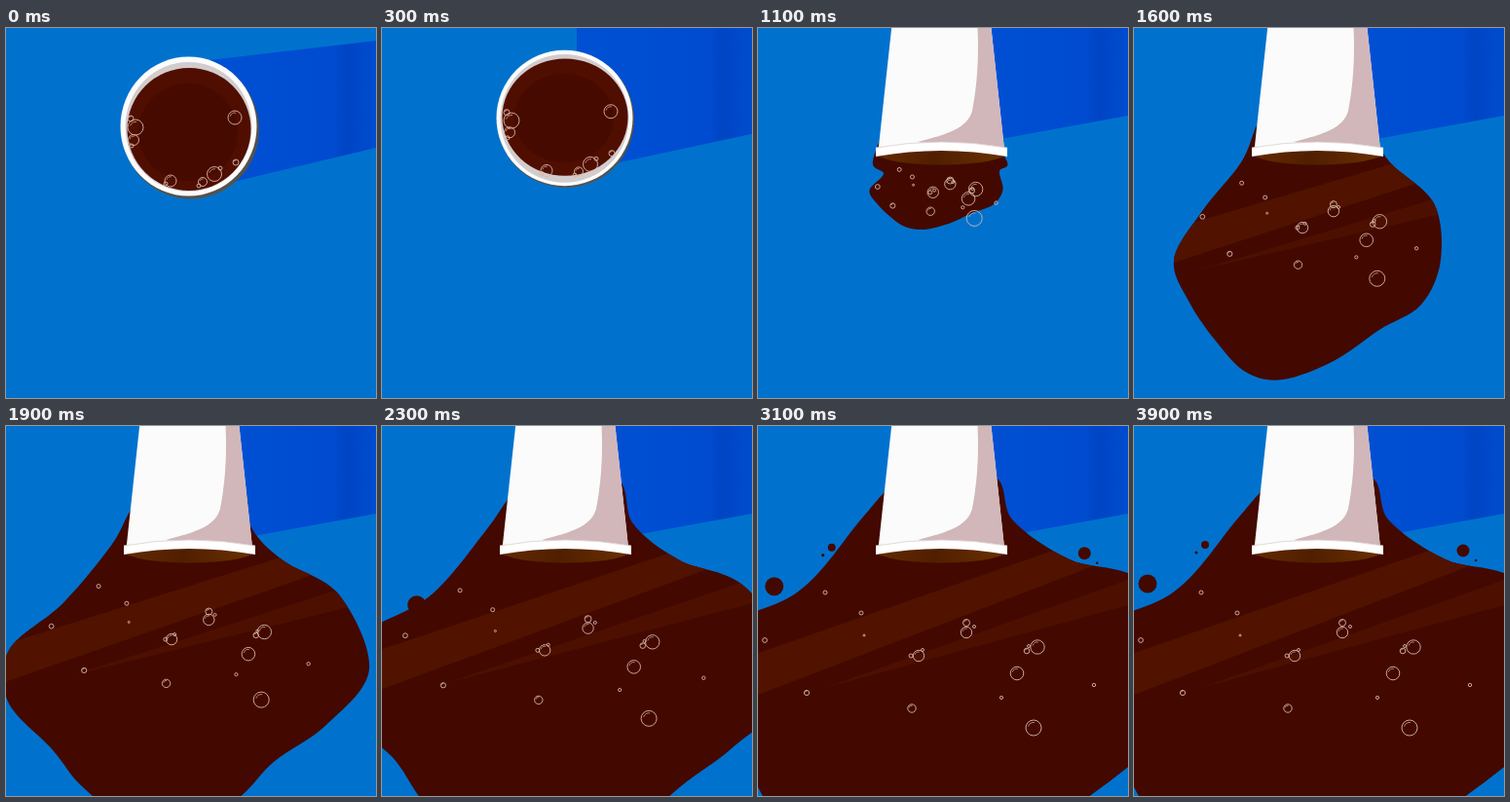
An HTML page with a canvas that plays this animation: 380x380 px, repeating every 4 s.

```html
<!DOCTYPE html>
<html>
<head>
<meta charset="utf-8">
<title>Pouring coffee</title>
<style>
html, body { margin: 0; width: 100%; height: 100%; overflow: hidden; background: #0072ce; }
canvas { display: block; width: 380px; height: 380px; }
</style>
</head>
<body>
<canvas id="stage" width="380" height="380"></canvas>
<script>
const ctx = document.getElementById('stage').getContext('2d');
const LOOP = 4000, STEP = 100, TAU = Math.PI * 2, MAX_TILT = 1.45;
const MOUTH = [188, 131];
const COFFEE = '#430900', STREAK = '#511300', FOAM = '#d9b6a5';

// Key points of the spill: half way, and spread past the stage
const spillMid = [[150,60], [127,98], [110,138], [70,188], [41,238], [57,282], [86,324], [116,354], [153,361],
  [205,342], [252,310], [295,284], [315,238], [308,180], [264,139], [247,110], [235,60]];
const spillEnd = [[150,50], [128,70], [104,98], [40,171], [-60,216], [-90,285], [-17,346], [20,402], [100,480],
  [260,470], [315,402], [385,346], [470,270], [400,163], [320,137], [262,97], [240,50]];

// x, y, radius; cup bubbles as seen from above, the others at rest
const cupBubbles = [[128,93,3], [133,102,8], [131,115,5.5], [129,121,2], [169,157,6], [164,160,2],
  [214,150,7.5], [202,158,4.5], [198,162,2], [220,144,2], [235,92,7], [236,138,3]];
const spillBubbles = [[7,220,2.4], [69,171,2], [106,192,2], [109,215,1], [50,274,2.6], [157,236,2],
  [165,236,5.7], [169,230,1.5], [214,202,3.5], [214,212,5.7], [222,206,1.5], [287,227,7.2], [276,231,2.8],
  [278,226,1.5], [266,254,6.8], [283,310,8], [250,279,1.6], [345,266,1.7], [158,290,4.2]];
const drops = [[14,162,9.5], [73,122,4], [64,130,1.6], [338,128,6.5], [351,138,1.3]];

const mix = (a, b, u) => a + (b - a) * u;
const mixPoints = (a, b, u) => a.map(([x, y], i) => [mix(x, b[i][0], u), mix(y, b[i][1], u)]);
const phase = (t, from, to) => Math.min(1, Math.max(0, (t - from) / (to - from)));
const easeOut = (u, power) => 1 - Math.pow(1 - u, power);
const fromMouth = ([x, y], sx, sy) => [mix(MOUTH[0], x, sx), mix(MOUTH[1], y, sy)];

function fill(color) { ctx.fillStyle = color; ctx.fill(); }

function ellipse(x, y, rx, ry, color) {
  ctx.beginPath();
  ctx.ellipse(x, y, rx, ry, 0, 0, TAU);
  fill(color);
}

function polygon(points, color) {
  ctx.beginPath();
  for (const [x, y] of points) ctx.lineTo(x, y);
  fill(color);
}

// Closed Catmull-Rom curve
function smoothPath(points) {
  const at = i => points[(i + points.length) % points.length];
  ctx.beginPath();
  ctx.moveTo(...points[0]);
  points.forEach((p, i) => {
    const before = at(i - 1), next = at(i + 1), after = at(i + 2);
    ctx.bezierCurveTo(
      p[0] + (next[0] - before[0]) / 6, p[1] + (next[1] - before[1]) / 6,
      next[0] - (after[0] - p[0]) / 6, next[1] - (after[1] - p[1]) / 6, ...next);
  });
}

function bubble(x, y, r) {
  ctx.strokeStyle = FOAM;
  ctx.lineWidth = 0.9;
  ctx.beginPath();
  ctx.arc(x, y, r, 0, TAU);
  ctx.stroke();
  if (r < 2.5) return;
  ctx.lineWidth = 0.7;
  ctx.beginPath();
  ctx.arc(x, y, r * 0.7, 3.4, 4.9);
  ctx.stroke();
}

function drawShadow(t) {
  const u = phase(t, 0, 700);
  const g = ctx.createLinearGradient(225, 0, 380, 0);
  g.addColorStop(0, '#0050d4');
  g.addColorStop(0.72, '#004bcf');
  g.addColorStop(0.8, '#0045c4');
  g.addColorStop(1, '#004ccf');
  polygon([[200, mix(34, -60, u)], [380, mix(13, -80, u)], [380, mix(123, 90, u)], [200, mix(166, 123, u)]], g);
}

function spillShape(t) {
  if (t >= 1600) return mixPoints(spillMid, spillEnd, easeOut(phase(t, 1600, 3100), 2.1));
  // The neck stays at the cup while the rest shrinks into the mouth
  const drip = 0.33 * phase(t, 700, 1100);
  const small = spillMid.map(p => p[1] < 140 ? fromMouth(p, 0.9, 1) : fromMouth(p, 0.5, drip));
  return mixPoints(small, spillMid, easeOut(phase(t, 1100, 1600), 1.5));
}

function drawSpill(t) {
  if (t >= 2200) {
    const left = 26 * (1 - easeOut(phase(t, 2200, 3900), 3));
    for (const [x, y, r] of drops) ellipse(x + (x < MOUTH[0] ? left : -left), y + left, r, r, COFFEE);
  }
  ctx.save();
  smoothPath(spillShape(t));
  fill(COFFEE);
  ctx.clip();
  const shown = phase(t, 1100, 1600);
  const scale = mix(mix(0.4, 0.85, shown), 1, easeOut(phase(t, 1600, 3100), 2.1));
  ctx.globalAlpha = shown;
  ctx.translate(0, MOUTH[1] * (1 - scale));
  ctx.scale(1, scale);
  polygon([[-5, 235], [300, 129], [380, 130], [-5, 278]], STREAK);
  polygon([[68, 269], [380, 158], [380, 184]], '#4d1000');
  ctx.restore();
}

function drawSpillBubbles(t) {
  const u = phase(t, 1100, 3100);
  const sx = mix(0.36, 1, easeOut(u, 2.1)), sy = mix(0.36, 1, easeOut(u, 2.7));
  for (const b of spillBubbles) bubble(...fromMouth(b, sx, sy), b[2]);
}

function drawBody(cy, tilt) {
  const x = 188.3, baseY = cy - 200 * Math.sin(tilt), base = 44 * Math.sqrt(Math.sin(tilt));
  ellipse(x, baseY, base, base * Math.cos(tilt), '#fbfbfb');
  ctx.save();
  polygon([[x - 64.5, cy - 8], [x - base, baseY], [x + base, baseY], [x + 64.5, cy - 8]], '#fbfbfb');
  ctx.clip();
  ctx.translate(0, cy - MOUTH[1]);
  ctx.beginPath();
  ctx.moveTo(222, -90);
  ctx.lineTo(225.5, 0);
  ctx.bezierCurveTo(227, 30, 225, 60, 220, 85);
  ctx.bezierCurveTo(215, 103, 195, 109, 164, 117);
  ctx.lineTo(270, 135);
  ctx.lineTo(270, -90);
  fill('#d1b7b9');
  ctx.restore();
}

function drawOpenCup(t) {
  const tilt = MAX_TILT * Math.pow(t / 1050, 1.5), cos = Math.cos(tilt);
  const turn = phase(t, 0, 700), pour = phase(t, 700, 1000);
  const cy = mix(mix(101, 81, turn), MOUTH[1], pour);
  ellipse(187.5 + 2 * (1 - turn), cy + 3 * (1 - turn), 70.5, 71.5 * cos, '#55524c');
  drawBody(cy, tilt);
  ellipse(187.5, cy, 70, 71.5 * cos, '#fcfcfc');
  ellipse(187.5, cy + 0.5, mix(65, 67.5, turn), mix(66.5, 69, turn) * cos, '#d3cccc');

  // The surface slides over the rim and hangs lower and lower
  const top = cy - mix(60, 66, turn) * cos;
  const bottom = mix(mix(167, 131.5, turn), 187, pour);
  ellipse(188, (top + bottom) / 2, mix(63.5, 66, turn), (bottom - top) / 2, '#4f0e00');
  ellipse(187, mix(107, cy - 19, turn), 51, mix(50, 42, turn) * cos, '#470a00');
  for (const [x, y, r] of cupBubbles) bubble(x, mix(cy, bottom, pour / 2) + mix(0, 4, turn) + (y - 101) * cos * mix(1, 0.9, turn), r);
}

function drawPouringCup() {
  const arc = (y, rise) => {
    ctx.moveTo(121, y);
    ctx.quadraticCurveTo(188, y - rise, 256, y);
  };
  drawBody(MOUTH[1], MAX_TILT);
  const inside = ctx.createLinearGradient(121, 0, 256, 0);
  inside.addColorStop(0, '#642a00');
  inside.addColorStop(0.45, '#501f00');
  inside.addColorStop(1, '#6a3000');
  ctx.beginPath();
  arc(130, 11);
  ctx.bezierCurveTo(236, 144, 140, 144, 121, 130);
  fill(inside);
  ctx.beginPath();
  arc(123, 12);
  ctx.lineTo(256, 132);
  ctx.quadraticCurveTo(188, 120, 121, 132);
  fill('#fff');
  ctx.strokeStyle = '#dccfd0';
  ctx.lineWidth = 0.8;
  ctx.beginPath();
  arc(123, 12);
  ctx.stroke();
}

function draw(t) {
  ctx.fillStyle = '#0072ce';
  ctx.fillRect(0, 0, 380, 380);
  drawShadow(t);
  if (t < 1000) return drawOpenCup(t);
  drawSpill(t);
  drawPouringCup();
  drawSpillBubbles(t);
}

const start = performance.now();
function tick() {
  const elapsed = (performance.now() - start) % LOOP;
  draw(Math.floor(elapsed / STEP) * STEP);
  requestAnimationFrame(tick);
}
tick();
</script>
</body>
</html>
```
